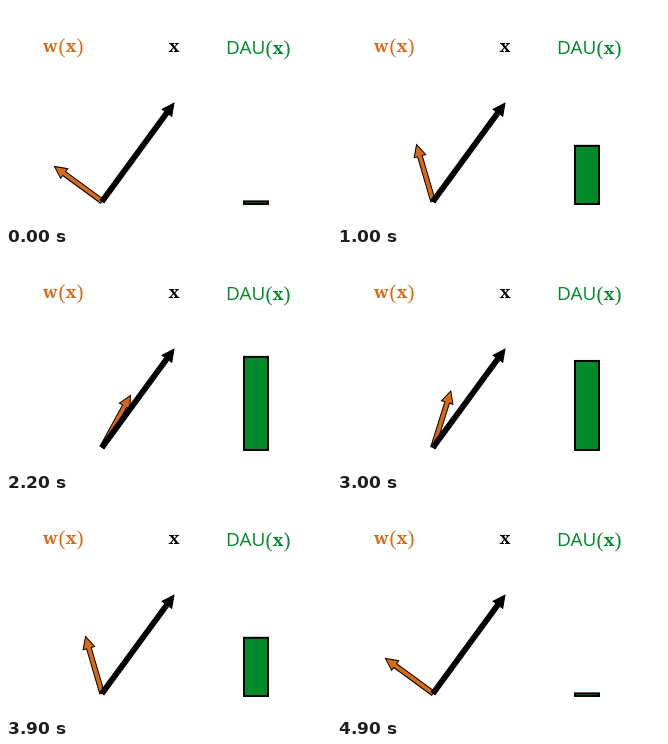
An HTML page that plays this animation: 325x218 px, repeating every 5 s.

```html
<!DOCTYPE html>
<html lang="en">
<head>
<meta charset="utf-8">
<title>DAU response to vector angle</title>
<style>
@property --turn {
  syntax: "<angle>";
  inherits: true;
  initial-value: 0deg;
}
html, body {
  margin: 0;
  width: 100%;
  height: 100%;
  overflow: hidden;
  background: #fff;
}
/* 25 held poses each way, 3.75 degrees apart */
svg {
  display: block;
  width: 100vw;
  height: 100vh;
  animation: swing 5s steps(25, jump-none) infinite;
}
@keyframes swing {
  0%, 100% { --turn: 0deg; }
  50% { --turn: 90deg; }
}
.arrow { stroke: #000; stroke-width: 1; stroke-miterlimit: 10; }
.weight {
  fill: #d96a14;
  transform: translate(96.1px, 195.3px) rotate(calc(var(--turn) - 143.8deg));
}
.input { transform: translate(96.1px, 195.3px) rotate(-53.8deg); }
.bar {
  --h: calc(2.6px + 91.3px * sin(var(--turn)));
  y: calc(198px - var(--h));
  height: var(--h);
  fill: #008a29;
  stroke: #000;
  stroke-width: 2;
}
text { text-anchor: middle; }
.vec { font: 600 17px "Noto Serif", serif; }
.paren { font: 21px "Liberation Serif", serif; }
.name { font: 19px "Open Sans", sans-serif; }
.orange { fill: #d96a14; }
.green { fill: #008a29; }
</style>
</head>
<body>
<svg viewBox="0 0 325 218">
  <defs>
    <g id="arg">
      <text class="paren" x="-9" y="1">(</text>
      <text class="vec">x</text>
      <text class="paren" x="9" y="1">)</text>
    </g>
  </defs>

  <g class="orange">
    <text class="vec" x="44.3" y="46">w</text>
    <use href="#arg" x="65" y="46"/>
  </g>
  <text class="vec" x="168" y="46">x</text>
  <g class="green">
    <text class="name" x="239.6" y="48">DAU</text>
    <use href="#arg" x="272" y="47.5"/>
  </g>

  <path class="arrow weight" d="M0-2.4H47V-6L59 0 47 6V2.4H0Z"/>
  <path class="arrow input" d="M0-2.4H109.7V-6L121.7 0 109.7 6V2.4H0Z"/>
  <rect class="bar" x="238" width="24"/>
</svg>
</body>
</html>
```
